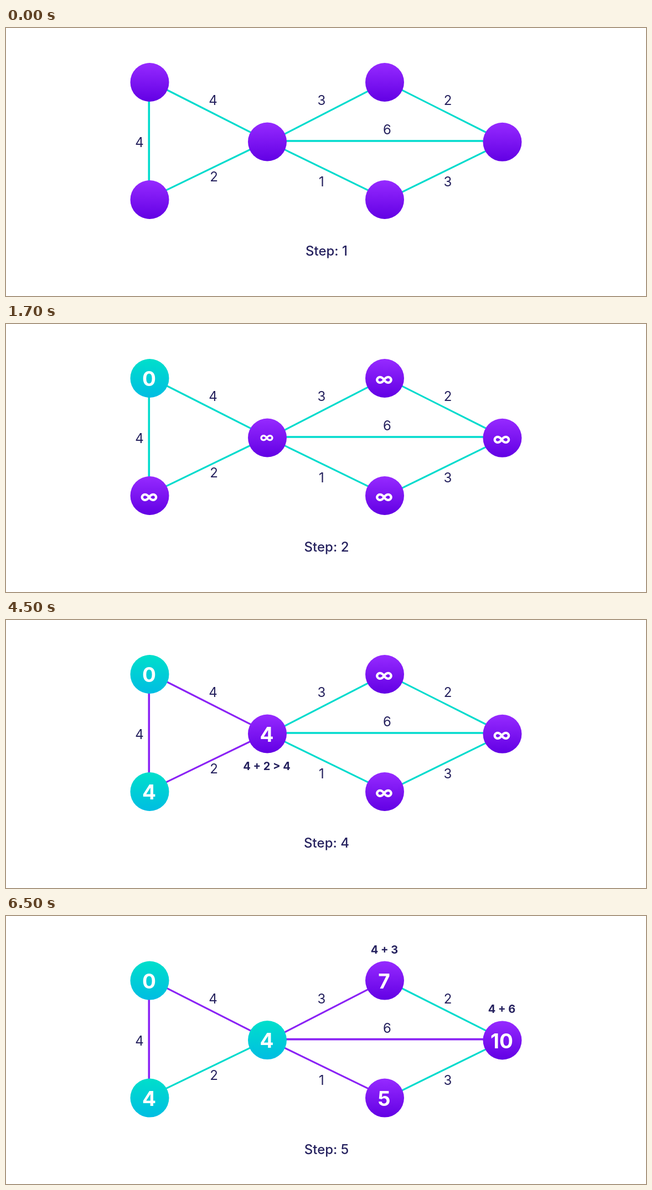
An HTML page for the animation above (8000 ms loop, 1156x484 px).

```html
<!DOCTYPE html>
<html lang="en">
<head>
<meta charset="utf-8">
<title>Shortest path steps</title>
<style>
  html, body { margin: 0; width: 100%; height: 100%; overflow: hidden; background: #fff; }
  svg { display: block; width: 1156px; height: 484px; }
  text { font-family: Inter, "Open Sans", sans-serif; text-anchor: middle; fill: #25215e; }
  .weight { font-size: 24px; }
  .step { font-size: 24px; font-weight: 500; }
  .sum { font-size: 20px; font-weight: 700; }
  .value { font-weight: 700; fill: #fff; }
</style>
</head>
<body>
<svg viewBox="0 0 1156 484">
  <defs>
    <linearGradient id="purple" x2="0" y2="1">
      <stop offset="0" stop-color="#962aff"/><stop offset="1" stop-color="#6200e4"/>
    </linearGradient>
    <linearGradient id="teal" x2="0" y2="1">
      <stop offset="0" stop-color="#00dfcb"/><stop offset="1" stop-color="#00bde2"/>
    </linearGradient>
  </defs>
  <g id="scene"></g>
</svg>
<script>
const TEAL = '#00dbcd', PURPLE = '#8a22f5', LOOP = 8000;
const scene = document.getElementById('scene');

function add(tag, attrs, text = '') {
  const el = document.createElementNS('http://www.w3.org/2000/svg', tag);
  for (const name in attrs) el.setAttribute(name, attrs[name]);
  el.textContent = text;
  return scene.appendChild(el);
}

// x1, y1, x2, y2, then weight and its position
const edges = [
  [258.3, 98, 258.3, 310, 4, 241, 215],
  [259.5, 96, 472, 203.7, 4, 374, 139],
  [259.5, 307.3, 472, 204.5, 2, 375.5, 277],
  [472, 207.4, 684, 98.6, 3, 570, 139],
  [472, 204, 896, 204, 6, 688.5, 192],
  [472, 204.4, 684, 307.6, 1, 570, 286],
  [684, 96.4, 896, 203, 2, 798, 139],
  [684, 311.7, 896, 207.8, 3, 798, 286]
].map(([x1, y1, x2, y2, weight, x, y]) => {
  add('text', { class: 'weight', x, y }, weight);
  return add('line', { x1, y1, x2, y2, 'stroke-width': y1 === y2 || x1 === x2 ? 3.6 : 3.1 });
});

const nodes = [
  [259.5, 98], [259.5, 310], [472, 205.5], [684, 98], [684, 310], [896.5, 205.8]
].map(([x, y]) => ({
  x, y,
  disc: add('circle', { cx: x, cy: y, r: 35 }),
  label: add('text', { class: 'value', x: x - 1 })
}));

const step = add('text', { class: 'step', x: 579, y: 411 });
const sums = [add('text', { class: 'sum' }), add('text', { class: 'sum' })];

// done: settled nodes; used: highlighted edges; sums: [text, x, y]
const states = [
  { at: 0, values: ['', '', '', '', '', ''], done: [], used: [] },
  { at: 500, values: [0, '∞', '∞', '∞', '∞', '∞'], done: [0], used: [] },
  { at: 2500, values: [0, 4, 4, '∞', '∞', '∞'], done: [0], used: [0, 1] },
  { at: 4500, values: [0, 4, 4, '∞', '∞', '∞'], done: [0, 1], used: [0, 1, 2],
    sums: [['4 + 2 > 4', 471, 271]] },
  { at: 6500, values: [0, 4, 4, 7, 5, 10], done: [0, 1, 2], used: [0, 1, 3, 4, 5], shift: 18.6,
    sums: [['4 + 3', 683.5, 49.4], ['4 + 6', 895.5, 156.9]] }
];

function setLabel({ x, y, label }, value, isCentre) {
  const infinite = value === '∞';
  const size = !infinite ? 37 : isCentre ? 26 : 33;
  label.textContent = value;
  label.setAttribute('font-size', size);
  label.setAttribute('y', infinite ? y + (isCentre ? -0.5 : 1) + size * 0.364 : y + 14.3);
}

let shown = -1;
function render(time) {
  const index = states.findLastIndex(s => s.at <= time % LOOP);
  if (index === shown) return;
  shown = index;
  const state = states[index];
  scene.setAttribute('transform', `translate(0 ${state.shift || 0})`);
  edges.forEach((edge, i) => edge.setAttribute('stroke', state.used.includes(i) ? PURPLE : TEAL));
  nodes.forEach((node, i) => {
    node.disc.setAttribute('fill', `url(#${state.done.includes(i) ? 'teal' : 'purple'})`);
    setLabel(node, state.values[i], i === 2);
  });
  sums.forEach((el, i) => {
    const [text, x, y] = state.sums?.[i] || ['', 0, 0];
    el.textContent = text;
    el.setAttribute('x', x);
    el.setAttribute('y', y);
  });
  step.textContent = `Step: ${index + 1}`;
}

const start = performance.now();
function tick() {
  render(performance.now() - start);
  requestAnimationFrame(tick);
}
tick();
</script>
</body>
</html>
```
